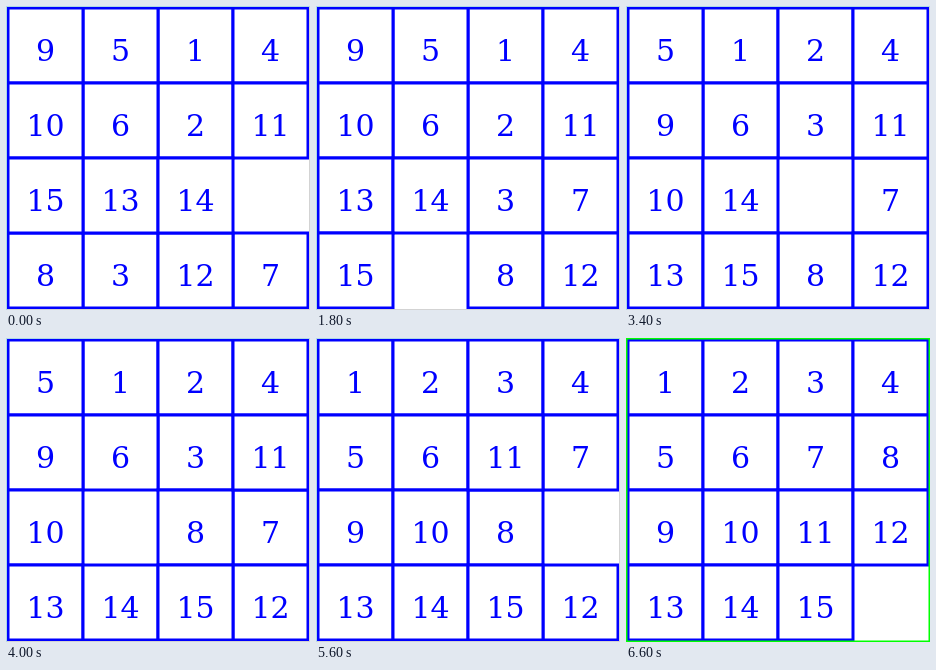
Recreate the animation shown at these times as an HTML page. Size 304 px wide and 304 px high, loop 8200 ms.

```html
<!DOCTYPE html>
<html lang="en">
<head>
<meta charset="utf-8">
<title>Fifteen puzzle</title>
<style>
html, body { margin: 0; width: 100%; height: 100%; overflow: hidden; background: #fff; }
svg { display: block; width: 304px; height: 304px; }
.tile rect { fill: #fff; stroke: #00f; stroke-width: 3; }
.tile text { fill: #00f; font: 30px "DejaVu Serif", serif; text-anchor: middle; }
.edge { fill: none; stroke-width: 1; }
#solved { fill: none; stroke: #0f0; stroke-width: 3; }
</style>
</head>
<body>
<svg id="board" viewBox="0 0 304 304">
  <g id="tiles"></g>
  <path class="edge" stroke="lightgray" d="M303.5 0V303.5H0"/>
  <path class="edge" stroke="lightblue" d="M.5 304V.5H304"/>
  <rect id="solved" width="304" height="304"/>
</svg>
<script>
const START = [9, 5, 1, 4, 10, 6, 2, 11, 15, 13, 14, 0, 8, 3, 12, 7];
const MOVES = "DLLLURRDLLUUURRDDDLULUURRDRDLURDD"; // path of the gap
const OFFSET = { U: -4, D: 4, L: -1, R: 1 };
const STEP = 200, CELL = 75, LOOP = 8200;
const SVG = "http://www.w3.org/2000/svg";

function add(parent, name, attrs) {
  const el = parent.appendChild(document.createElementNS(SVG, name));
  for (const key in attrs) el.setAttribute(key, attrs[key]);
  return el;
}

const layer = document.getElementById("tiles");
const solved = document.getElementById("solved");
const tiles = [];
for (let n = 1; n <= 15; n++) {
  tiles[n] = add(layer, "g", { class: "tile" });
  add(tiles[n], "rect", { x: 2, y: 2, width: CELL, height: CELL });
  add(tiles[n], "text", { x: 39.5, y: 55 }).textContent = n;
}

const states = [START];
for (const move of MOVES) {
  const next = states[states.length - 1].slice();
  const gap = next.indexOf(0), from = gap + OFFSET[move];
  next[gap] = next[from];
  next[from] = 0;
  states.push(next);
}

let shown = -1;
function draw(now) {
  const step = Math.min(MOVES.length, Math.floor(now % LOOP / STEP));
  if (step !== shown) {
    shown = step;
    states[step].forEach((n, i) => {
      if (n) tiles[n].setAttribute("transform", `translate(${i % 4 * CELL} ${Math.floor(i / 4) * CELL})`);
    });
    solved.style.display = step === MOVES.length ? "" : "none";
  }
}

const begin = performance.now();
function tick() {
  draw(performance.now() - begin);
  requestAnimationFrame(tick);
}
tick();
</script>
</body>
</html>
```
